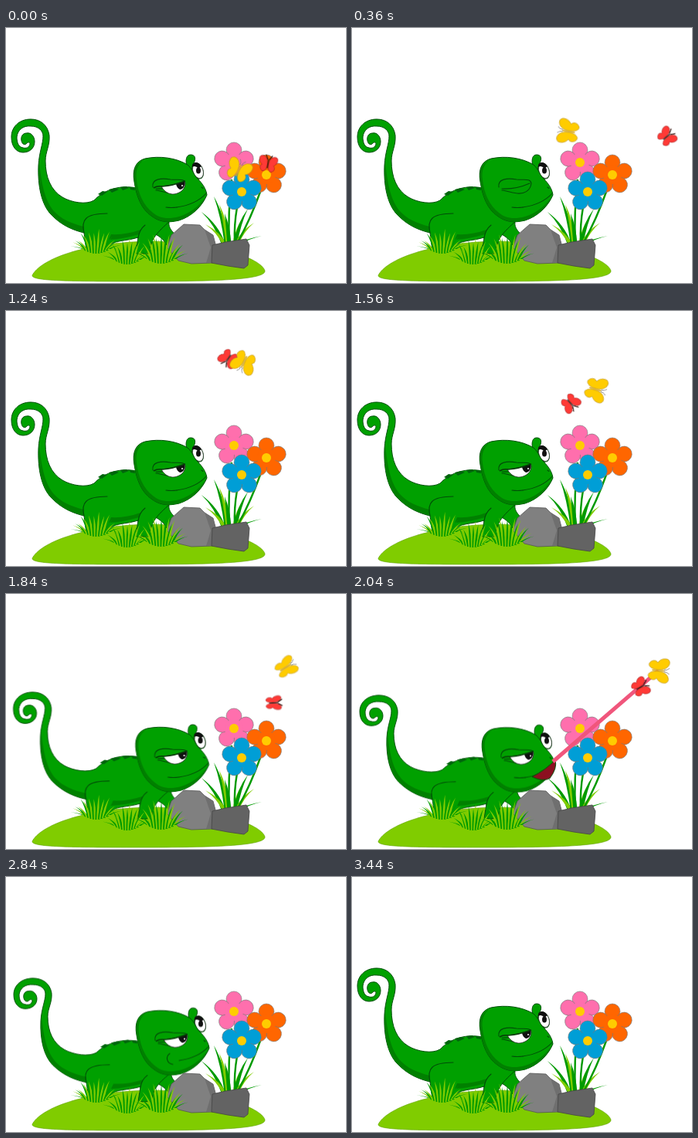
Recreate the animation shown at these times as an HTML page. Size 440 by 330 pixels, loop 4 s.

```html
<!DOCTYPE html>
<html lang="en">
<head>
<meta charset="utf-8">
<title>Chameleon and butterflies</title>
<style>
html, body { margin: 0; width: 100%; height: 100%; overflow: hidden; background: #fff; }
svg { display: block; width: 100vw; height: 100vh; }
.loop { animation: 4s linear infinite; }
.step { animation: 4s step-end infinite; }
.skin { fill: #00a000; stroke: #004d08; stroke-width: 1; }
.shade { fill: #008000; }
.ink { fill: none; stroke: #004d08; stroke-width: 1.1; stroke-linecap: round; }
.wings { animation: flap .16s linear infinite; }

#body { animation-name: crouch; transform-origin: 0 275px; }
#head { animation-name: duck; }
#nearOpen { animation-name: blinkNear; }
#farOpen { animation-name: blinkFar; }
#corner { animation-name: corner; }
#cheek { animation-name: chew; transform-origin: 210px 230px; }
#gape { animation-name: gape; }
#tongue { animation-name: tongue; stroke-dasharray: 182 400; }
#yellow { animation-name: yellow; }
#red { animation-name: red; }

@keyframes flap { 0%, 25%, 75%, 100% { transform: none; } 50% { transform: scaleX(.75); } }
@keyframes crouch {
  0%, 43.5%, 86%, 100% { transform: none; }
  46% { transform: translate(2.5px, 0) scaleY(.943); }
  48%, 83% { transform: translate(3px, 0) scaleY(.917); }
}
@keyframes duck {
  0%, 43.5%, 86%, 100% { transform: none; }
  46% { transform: translate(2.5px, 5px); }
  48%, 83% { transform: translate(3px, 5.5px); }
}
@keyframes blinkNear { 0%, 11%, 69% { opacity: 1; } 6%, 65% { opacity: 0; } }
@keyframes blinkFar { 0%, 69% { opacity: 1; } 65% { opacity: 0; } }
@keyframes corner { 0%, 85% { opacity: 1; } 58% { opacity: 0; } }
@keyframes chew {
  0%, 57.9% { opacity: 0; transform: scale(.5); }
  58% { opacity: 1; transform: scale(.7); }
  60%, 64%, 68%, 71%, 83% { opacity: 1; transform: none; }
  66%, 70% { opacity: 1; transform: scale(.75); }
  85%, 100% { opacity: 0; transform: none; }
}
@keyframes gape { 0%, 55% { opacity: 0; } 49% { opacity: 1; } }
@keyframes tongue {
  0%, 49%, 54%, 100% { stroke-dashoffset: 183px; }
  51% { stroke-dashoffset: 0; }
}
@keyframes yellow {
  0%, 2% { transform: translate(301px, 184px) rotate(25deg); }
  5% { transform: translate(297px, 160px) rotate(-30deg); }
  9% { transform: translate(280px, 134px) rotate(-80deg); }
  12% { transform: translate(265px, 115px) rotate(-65deg); }
  15% { transform: translate(254px, 94px) rotate(-30deg); }
  18% { transform: translate(251px, 72px) rotate(0deg); }
  21% { transform: translate(259px, 53px) rotate(15deg); }
  24% { transform: translate(275px, 41px) rotate(60deg); }
  27% { transform: translate(296px, 43px) rotate(120deg); }
  29% { transform: translate(306px, 52px) rotate(165deg); }
  31% { transform: translate(308px, 66px) rotate(205deg); }
  34% { transform: translate(301px, 84px) rotate(185deg); }
  37% { transform: translate(306px, 98px) rotate(130deg); }
  40% { transform: translate(320px, 103px) rotate(95deg); }
  43% { transform: translate(343px, 102px) rotate(75deg); }
  46% { transform: translate(362px, 95px) rotate(58deg); }
  49% { transform: translate(385px, 92px) rotate(70deg); }
  51% { transform: translate(398px, 98px) rotate(95deg); }
  54% { transform: translate(262px, 217px) rotate(95deg); opacity: 1; }
  54.01%, 100% { transform: translate(262px, 217px); opacity: 0; }
}
@keyframes red {
  0%, 2% { transform: translate(339px, 176px) rotate(10deg); }
  5% { transform: translate(372px, 163px) rotate(65deg); }
  9% { transform: translate(407px, 141px) rotate(50deg); }
  12% { transform: translate(419px, 124px) rotate(20deg); }
  15% { transform: translate(420px, 104px) rotate(-10deg); }
  18% { transform: translate(405px, 82px) rotate(-55deg); }
  21% { transform: translate(377px, 66px) rotate(-100deg); }
  24% { transform: translate(345px, 52px) rotate(-85deg); }
  27% { transform: translate(312px, 46px) rotate(-100deg); }
  29% { transform: translate(299px, 50px) rotate(-120deg); }
  31% { transform: translate(288px, 61px) rotate(-145deg); }
  34% { transform: translate(275px, 82px) rotate(-165deg); }
  37% { transform: translate(273px, 104px) rotate(-195deg); }
  40% { transform: translate(287px, 126px) rotate(-235deg); }
  43% { transform: translate(325px, 141px) rotate(-262deg); }
  46% { transform: translate(346px, 141px) rotate(-273deg); }
  49% { transform: translate(366px, 131px) rotate(-295deg); }
  51% { transform: translate(374px, 120px) rotate(-300deg); }
  54% { transform: translate(262px, 217px) rotate(-300deg); opacity: 1; }
  54.01%, 100% { transform: translate(262px, 217px); opacity: 0; }
}
</style>
</head>
<body>
<svg viewBox="0 0 440 330" preserveAspectRatio="none">
  <defs>
    <g id="petals">
      <circle id="p" cy="-16" r="10"/>
      <use href="#p" transform="rotate(72)"/><use href="#p" transform="rotate(144)"/>
      <use href="#p" transform="rotate(216)"/><use href="#p" transform="rotate(288)"/>
      <circle r="12" stroke="none"/>
      <circle r="6" fill="#fc0" stroke="none"/>
    </g>
    <path id="wing" d="M1 0C1-9 7-15 13-13C18-11 16-1 10 2C14 4 13 11 8 13C4 14 1 8 1 2Z"/>
  </defs>

  <path d="M34 320C44 300 100 277 190 276C270 277 330 298 335 314C337 325 280 328 180 328C90 328 32 328 34 320Z" fill="#80cc00" stroke="#5fa000" stroke-width=".6"/>
  <g id="leaves"></g>
  <path d="M292 196Q287 240 289 277M329 212Q317 246 300 277M299 232Q295 255 296 277" fill="none" stroke="#009a00" stroke-width="2.4"/>

  <g id="body" class="loop">
    <path class="skin" d="M194 246L212 248C208 258 215 263 226 275L222 287L208 281C204 273 198 269 188 264Z"/>
    <path class="skin" d="M168 207C150 203 128 208 114 223C104 229 85 226 73 219C58 210 51 193 51 172C51 160 57 152 56 139C54 125 44 118 32 118C17 118 7 128 7 141C7 153 13 161 22 161C31 161 37 155 37 147C37 140 32 135 27 136C21 136 19 141 20 146C21 151 25 152 27 149C29 147 31 148 31 150C30 155 26 156 22 155C16 154 14 148 14 141C15 132 22 126 32 127C42 127 48 133 48 140C48 150 43 160 42 178C41 205 46 228 58 241C72 256 88 262 101 265L104 288L130 288C132 274 152 277 171 271L168 292L186 292C186 274 196 264 212 250Z"/>
    <path class="shade" d="M43 172C41 205 46 228 58 241C72 256 88 262 101 264L101 257C84 253 71 247 62 237C51 224 46 205 43 172ZM133 274Q152 273 172 267L174 261Q155 268 136 267Z"/>
    <path class="ink" d="M101 265C97 249 102 240 131 240M171 272C172 264 175 259 180 255"/>
    <path d="M119 215l6-4l6 1l-7 5zM133 209l8-2l5 2l-9 4zM148 206l7-1l4 2l-8 3zM160 206l6 0l1 4l-6-1z" fill="#00650c"/>
  </g>

  <g id="head" class="loop">
    <path class="skin" d="M234 180C232 171 233 164 239 164C245 164 246 169 243 175L250 190Z"/>
    <ellipse class="skin" cx="248" cy="185" rx="7" ry="10.500" transform="rotate(-20 248 185)"/>
    <g id="farOpen" class="step">
      <ellipse cx="248.500" cy="185" rx="6.500" ry="10" fill="#fff" stroke="#333" stroke-width=".7" transform="rotate(-20 248 185)"/>
      <ellipse cx="249" cy="184.500" rx="3" ry="4" fill="#111"/>
      <path d="M241 177C244 172 250 174 253 179L249 182Q245 177 241 180Z" fill="#111"/>
    </g>
    <path class="skin" d="M166 199C163 183 168 172 180 169C199 165 220 168 235 177C242 183 243 191 248 195C254 201 259 208 260 216C254 231 240 244 224 249C208 253 197 250 188 243C176 235 169 219 166 199Z"/>
    <path class="shade" d="M166 199C169 219 176 235 188 243C197 250 208 253 224 249C240 244 252 232 258 219C249 231 238 240 224 244C209 248 198 246 190 239C178 230 171 214 169 197C167 184 171 176 178 171C168 175 164 184 166 199Z"/>
    <path class="ink" d="M190 206C188 195 201 194 213 196C223 197 231 194 232 201C231 211 222 215 214 214C204 213 198 210 194 210"/>
    <path class="ink" d="M194 208Q212 209 230 201"/>
    <g id="nearOpen" class="step">
      <path d="M201 205Q216 204 231 198C234 207 226 215 215 215Q206 214 201 205Z" fill="#fff" stroke="#222" stroke-width=".7"/>
      <path d="M220 202L231 198C232 205 229 209 225 209Q221 207 220 202Z" fill="#111"/>
      <circle cx="228" cy="204" r="1" fill="#fff"/>
      <path d="M191 207Q196 204 202 205Q216 204 232 198" fill="none" stroke="#063b08" stroke-width="1.600"/>
    </g>
    <path class="ink" d="M221 232C235 230 250 224 259 214M253 206l2 1.500"/>
    <path id="corner" class="ink step" d="M207 232Q214 233 221 232"/>
    <path id="gape" class="step" d="M230 231Q248 222 260 209Q263 220 253 233Q244 238 230 231Z" fill="#8c1020" stroke="#004d08"/>
    <path id="cheek" class="ink loop" d="M209 223C203 227 205 236 213 237"/>
  </g>

  <path d="M208 284L214 268L230 254L251 255L257 261L268 268L272 283L267 304L240 305L223 301Z" fill="#808080" stroke="#555" stroke-width=".8"/>
  <path d="M257 261L268 268L272 283L267 304L259 304L265 284Z" fill="#6f6f6f"/>
  <path d="M267 281L284 277L311 273L315 281L313 307L308 311L287 308L266 304Z" fill="#636363" stroke="#444" stroke-width=".8"/>
  <g id="grass"></g>

  <g stroke="#777" stroke-width=".6">
    <use href="#petals" transform="translate(295 174)" fill="#ff6fad"/>
    <use href="#petals" transform="translate(337 190)" fill="#f60"/>
    <use href="#petals" transform="translate(305 212)" fill="#009ed6"/>
  </g>

  <path id="tongue" class="loop" d="M260 217L398 98" fill="none" stroke="#f0567c" stroke-width="5"/>

  <g id="red" class="loop">
    <g class="wings" fill="#ff3a36" stroke="#a31c1c" stroke-width=".9">
      <use href="#wing" transform="scale(.75)"/><use href="#wing" transform="scale(-.75 .75)"/>
    </g>
    <path d="M0-5V5M-1-6L-4-11M1-6L4-11" fill="none" stroke="#32120c" stroke-width="1.300" stroke-linecap="round"/>
  </g>
  <g id="yellow" class="loop">
    <g class="wings" fill="#fc0" stroke="#b38a20" stroke-width=".6">
      <use href="#wing"/><use href="#wing" transform="scale(-1 1)"/>
    </g>
    <path d="M0-7V8" stroke="#d9aa20" stroke-width="1.600" stroke-linecap="round"/>
    <path d="M-1-7Q-1-11-4-14M1-7Q1-11 4-14" fill="none" stroke="#777" stroke-width=".8"/>
  </g>
</svg>
<script>
const DARK = '#009a00', LIGHT = '#80cc00';
const grass = document.getElementById('grass'), leaves = document.getElementById('leaves');
let seed = 11;
const rnd = () => (seed = seed * 16807 % 2147483647) / 2147483647;

// A curved blade that narrows from its base to its tip.
function blade(group, x, y, tx, ty, w, fill) {
  const cx = x + (tx - x) * .3, cy = y + (ty - y) * .6;
  const p = document.createElementNS('http://www.w3.org/2000/svg', 'path');
  p.setAttribute('d', `M${x - w} ${y}Q${cx - w} ${cy} ${tx} ${ty}Q${cx + w} ${cy} ${x + w} ${y}Z`);
  p.setAttribute('fill', fill);
  group.append(p);
}

function tuft(x, y, spread, height, n) {
  for (let i = 0; i < n; i++) {
    const u = 2 * i / (n - 1) - 1;
    const h = height * (1 - .75 * u * u) * (.65 + .35 * rnd());
    blade(grass, x + u * spread * .5, y - 6 * u * u, x + u * spread, y - h - 4 * u * u, 1.5, i % 2 ? LIGHT : DARK);
  }
}

const tips = [[253, 238], [258, 254], [269, 218], [276, 228], [283, 240], [309, 242], [313, 234], [321, 252], [331, 269]];
tips.forEach(([x, y], i) => blade(leaves, 291 + (x - 291) * .25, 280, x, y, 2.6, i % 2 ? LIGHT : DARK));

tuft(117, 292, 34, 36, 21);
tuft(157, 306, 32, 36, 21);
tuft(201, 305, 35, 43, 21);
</script>
</body>
</html>
```
